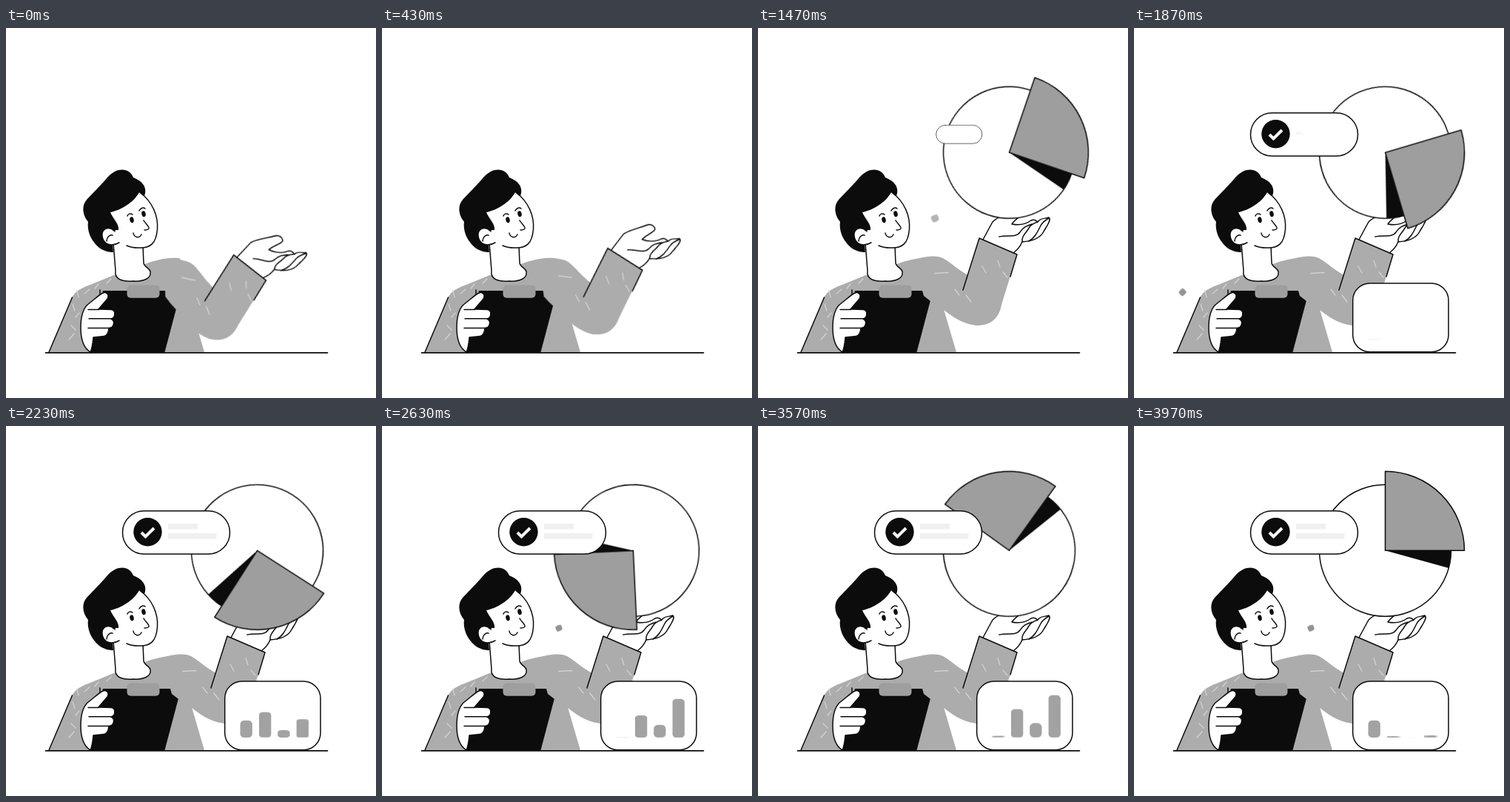
Recreate the animation shown at these times as an HTML page. Size 500 by 500 pixels, loop 4 s.

```html
<!DOCTYPE html>
<html lang="en">
<head>
<meta charset="utf-8">
<title>Presenter with charts</title>
<style>
  html, body { margin: 0; width: 100%; height: 100%; overflow: hidden; background: #fff; }
  svg { display: block; width: 100%; height: 100%; }

  .ink { fill: none; stroke: #0c0c0c; stroke-width: 1.5; stroke-linecap: round; stroke-linejoin: round; }
  .paper { fill: #fff; }
  .black { fill: #0c0c0c; }
  .wool { fill: #acacac; }
  .mid { fill: #9e9e9e; }
  .dash { fill: none; stroke: #d2d2d2; stroke-width: 1.3; stroke-linecap: round; }

  .move { animation: 4s cubic-bezier(.37, 0, .63, 1) infinite both; }

  /* arm swings up around the shoulder */
  .arm { transform-origin: 216px 329px; animation-name: lift; }
  @keyframes lift { 0% { transform: rotate(14.8deg); } 25%, 100% { transform: none; } }

  .eyes { animation-name: dim; }
  @keyframes dim { 0%, 19.5%, 22%, 100% { opacity: 1; } 20.25%, 21.25% { opacity: .62; } }

  /* objects that grow into place */
  .pie { transform-origin: 339.5px 257px; animation-name: pie; }
  @keyframes pie { 0%, 27% { transform: scale(0); } 33.3%, 100% { transform: none; } }
  .spin { transform-origin: 339.5px 168.3px; animation-name: spin; animation-timing-function: linear; }
  @keyframes spin { 0%, 33.33% { transform: rotate(0deg); } 99.2%, 100% { transform: rotate(360deg); } }

  .pill { transform-origin: 303px 143.5px; animation-name: pill; }
  @keyframes pill { 0%, 33.75% { transform: scale(0); } 40.4%, 100% { transform: none; } }
  .tick { transform-origin: 191.5px 143.2px; animation-name: tick; }
  @keyframes tick { 0%, 40% { transform: scale(0); } 46%, 100% { transform: none; } }
  .rows { transform-origin: 219px 142px; animation-name: rows; }
  @keyframes rows { 0%, 45% { transform: scale(0); } 51.5%, 100% { transform: none; } }

  .card { transform-origin: 360px 438px; animation-name: card; }
  @keyframes card { 0%, 40.2% { transform: scale(0); } 46.4%, 100% { transform: none; } }

  /* chart bars rise and fall from their base line */
  .bar { transform-origin: 0 421px; }
  .b1 { animation-name: b1; }
  .b2 { animation-name: b2; }
  .b3 { animation-name: b3; }
  .b4 { animation-name: b4; }
  @keyframes b1 {
    0%, 46.3%, 64.9% { transform: scaleY(0); }
    55.5%, 79.5% { transform: none; }
    89% { transform: scaleY(.1); }
    98.5%, 100% { transform: none; }
  }
  @keyframes b2 {
    0%, 47.9%, 72.9%, 97.9% { transform: scaleY(0); }
    60.4%, 85.4% { transform: none; }
    100% { transform: scaleY(.05); }
  }
  @keyframes b3 {
    0%, 49.7%, 74.7%, 99.7%, 100% { transform: scaleY(0); }
    62.2%, 87.2% { transform: none; }
  }
  @keyframes b4 {
    0%, 50%, 74.7% { transform: scaleY(0); }
    63%, 87.5% { transform: none; }
    100% { transform: scaleY(.04); }
  }

  /* drifting specks */
  .left { animation-name: left; }
  .right { animation-name: right; }
  .crumb { animation-name: crumb; }
  @keyframes left {
    0%, 17% { transform: translate(66px, 300px) scale(0); opacity: .55; }
    20.75% { transform: translate(66px, 308.5px) scale(1.8); opacity: .55; }
    25%, 41% { transform: translate(66px, 350px) scale(0); opacity: 1; }
    46.75% { transform: translate(65.5px, 357px) scale(1.1); }
    52%, 71% { transform: translate(66px, 364px) scale(0); }
    78.25% { transform: translate(66px, 368px) scale(.95); }
    84%, 100% { transform: translate(66px, 369px) scale(0); opacity: 1; }
  }
  @keyframes crumb {
    0%, 18% { transform: translate(83.5px, 310px) scale(0); }
    20.75% { transform: translate(83.5px, 314px) scale(.6); }
    24%, 100% { transform: translate(83.5px, 320px) scale(0); }
  }
  @keyframes right {
    0%, 32% { transform: translate(239px, 250px) scale(0); opacity: .7; }
    36.75% { transform: translate(239px, 257px) scale(1.15); opacity: .7; }
    42%, 60% { transform: translate(239px, 270px) scale(0); opacity: 1; }
    65.75% { transform: translate(239px, 273px) scale(1); }
    71%, 93% { transform: translate(239px, 273px) scale(0); }
    99.25%, 100% { transform: translate(239px, 273px) scale(1); opacity: 1; }
  }
</style>
</head>
<body>
<svg viewBox="0 0 500 500">
  <!-- specks -->
  <g fill="#949494">
    <path class="move left" d="M-4.8 0Q-2.5 -3.5 0 -5Q3.5 -3.5 5 0Q2.5 3.5 0 5Q-3.5 3.5 -4.8 0Z"/>
    <path class="move crumb" d="M-5 0L0 -5L5 0L0 5Z"/>
    <path class="move right" d="M-4.8 -1.5Q-2 -4 2.5 -4.6Q4.6 -2 4.8 1.5Q2.5 4.5 -2 4.8Q-4.5 2 -4.8 -1.5Z"/>
  </g>

  <!-- torso -->
  <path class="wool" d="M58 438L89.500 364C94 355 103 351 115 346.500L148 333L196 316C212 311 224 310 234 311L250 330L251 380L268 438Z"/>
  <path class="ink" d="M58 438L89.500 364"/>
  <path class="dash" d="M96 355L98 364M106 359L113 353M120 352L125 346M136 345L142 339M90 373L93 382M94 391L99 385M88 402L94 408M85 421L92 413"/>

  <!-- head -->
  <path class="ink paper" d="M145 290L148 328C146 341 160 343 172 342C186 343 197 338 195 329C194 324 186 323 186 317L185 294"/>
  <path class="paper" d="M138 248L181 222C198 235 206 254 204.500 272C203 290 196 298 179 297C160 297 150 293 145 288Z"/>
  <path class="ink" d="M181 222C198 235 206 254 204.500 272C203 290 196 298 179 297C173 297 167 296 163 294"/>
  <path class="black" d="M187 227C190 219 189 209 172 202C168 192 158 189 147 194C139 198 135 205 129 211L109 232C102 240 103 253 111 262C109 275 116 289 126 297C133 302 140 303 145 303L144 290L148 273H152C153 264 145 259 141 249C160 245 175 232 180 222C183 225 185 227 187 227Z"/>
  <path class="ink paper" style="stroke:none" d="M146 274C139 267 129 271 130 281C131 291 141 297 153 290Z"/>
  <path class="ink" d="M146 274C139 267 129 271 130 281C131 291 141 297 153 290M136 288C136 283 140 279 144 280"/>
  <g class="move eyes black">
    <ellipse cx="170" cy="259.300" rx="2.700" ry="4" transform="rotate(-12 170 259.300)"/>
    <ellipse cx="186" cy="251.200" rx="2.700" ry="4" transform="rotate(-12 186 251.200)"/>
  </g>
  <path class="ink" d="M164 254C165 251 168 250 171 252M180 247C182 243 186 242 188 244M186 260C188 264 194 268 193 271C192 273 189 273 187 273M172 277C173 283 180 285 183 279"/>

  <!-- clipboard -->
  <path class="black" d="M131 355H236.500L214.500 438H114Z"/>
  <path class="ink" d="M127 354V362"/>

  <!-- raised arm -->
  <g class="move arm">
    <path class="ink paper" d="M304 286L317 262C322 256 340 249 348 244C354 242 360 247 357 251C353 256 347 259 343 265C353 267 361 266 369 260C373 258 376 260 378 262C382 256 389 258 393 256C397 259 390 268 386 275C382 283 372 288 357 289C354 296 349 301 345 304L330 310Z"/>
    <path class="ink" d="M326 282C338 279 349 284 354 276C358 269 364 267 370 265M357 289C356 282 361 278 365 272C367 267 372 264 378 262M366 288C374 284 378 275 382 267C384 263 388 260 393 257"/>
    <path class="wool" d="M205 315C222 309 240 306 250 311C262 318 272 328 284 334L299 284L350 306L329 374C326 392 315 402 295 402C275 400 260 388 250 380L233 369L224 362L222 355L208 335Z"/>
    <path class="ink" d="M277 354L299 284L350 306L341 336"/>
    <path class="dash" d="M239 331.500L257 330.500M266 353L272 361M281 361L288 370M303 322L308 331M324 314L327 323M331 330L337 337"/>
  </g>

  <rect class="mid" x="163.500" y="347.500" width="44" height="17.300" rx="5"/>

  <!-- holding hand -->
  <path class="ink paper" d="M114 438C104 432 101 420 101 405C101 392 104 380 110 374C118 368 125 361 131 358C136 356 140 361 137 366L125 380L142 380.500C149 381 148 392 142 393C148 396 146 405 139 405.500C138 416 134 417 128 417L118 418C117 429 116 434 114 438Z"/>
  <path class="ink" d="M111 380.500H126M112 392.700H142M111 405.500H139"/>

  <!-- pie chart -->
  <g class="move pie">
    <g class="move spin">
      <circle class="ink paper" cx="339.500" cy="168.300" r="89"/>
      <path class="black" d="M339.500 168.300H428.500A89 89 0 0 1 425.300 192.100Z"/>
      <path class="ink mid" d="M339.500 168.300V61.300A107 107 0 0 1 446.500 168.300Z"/>
    </g>
  </g>

  <!-- status pill -->
  <g class="move pill">
    <rect class="ink paper" x="157.500" y="114.800" width="145" height="58.200" rx="29.100"/>
    <g class="move tick">
      <circle class="black" cx="191.500" cy="143.200" r="19.200"/>
      <path d="M183 144L188.500 149.500L200 138" fill="none" stroke="#fff" stroke-width="4"/>
    </g>
    <g class="move rows" fill="#f0f0f0">
      <rect x="219" y="132" width="40" height="7.500"/>
      <rect x="219" y="145" width="65.500" height="7.500"/>
    </g>
  </g>

  <!-- bar chart card -->
  <g class="move card">
    <rect class="ink paper" x="295.700" y="345" width="129.300" height="92.800" rx="23"/>
    <g fill="#a2a2a2">
      <rect class="move bar b1" x="316.500" y="398" width="16.300" height="23" rx="5"/>
      <rect class="move bar b2" x="342" y="372" width="16.300" height="49" rx="5"/>
      <rect class="move bar b3" x="367.200" y="400" width="16.300" height="21" rx="6"/>
      <rect class="move bar b4" x="392.600" y="361" width="16.300" height="60" rx="5"/>
    </g>
  </g>

  <path class="ink" style="stroke-width:1.7" d="M53.500 438.800H434.500"/>
</svg>
</body>
</html>
```
